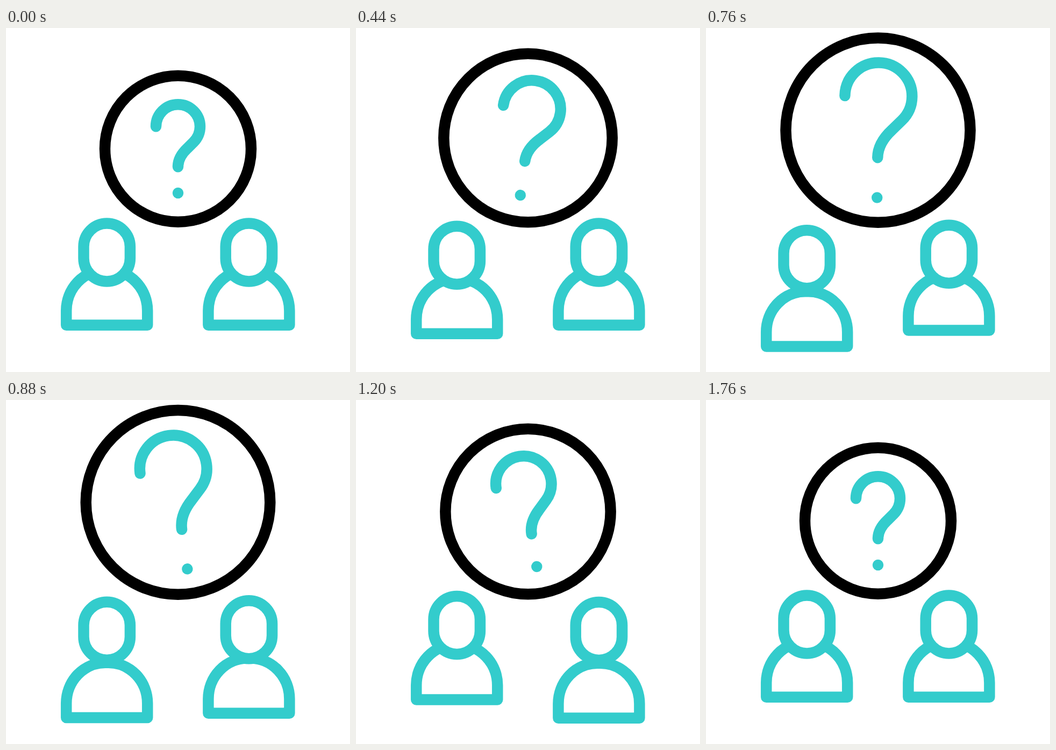
Recreate the animation shown at these times as an HTML page. Size 640 by 640 pixels, loop 1.84 s.

```html
<!DOCTYPE html>
<html lang="en">
<head>
<meta charset="utf-8">
<title>Question between two people</title>
<style>
  html, body { margin: 0; width: 100%; height: 100%; overflow: hidden; background: #fff; }
  svg {
    display: block; width: 100%; height: 100%;
    fill: none; stroke: #3cc; stroke-width: 20.5;
    stroke-linecap: round; stroke-linejoin: round;
  }

  /* The bubble grows while its outline keeps its weight. */
  .bubble * { vector-effect: non-scaling-stroke; stroke-width: 3.2vmin; }
  .ring { stroke: #000; transform-origin: 320px 356.8px; }
  .mark { transform-origin: 320px 224.7px; }
  .person { --delay: 0s; }
  .second { --delay: .36s; }
  .head { fill: #fff; }

  .ring, .mark, .head, .body {
    animation: 1.84s cubic-bezier(.667, 0, .333, 1) infinite;
  }
  .ring { animation-name: grow; }
  .mark { animation-name: lift, tilt; }
  .head { animation-name: nod; animation-delay: var(--delay); }
  .body { animation-name: sink; animation-delay: var(--delay); }

  @keyframes grow {
    0%, 2.174%, 86.957%, 100% { scale: 1; }
    43.478% { scale: 1.262; }
  }
  @keyframes lift {
    0%, 2.174%, 86.957%, 100% { translate: 0 0; scale: 1; }
    43.478% { translate: 0 -34.6px; scale: 1.525; }
  }
  @keyframes tilt {
    0%, 2.174%, 86.957%, 100% { rotate: 0deg; }
    28.261% { rotate: 7.8deg; }
    56.522% { rotate: -10deg; }
  }
  @keyframes nod {
    0%, 8.696%, 76.087%, 100% { translate: 0 0; }
    41.304% { translate: 0 12.7px; }
  }
  @keyframes sink {
    0%, 8.696%, 76.087%, 100% { translate: 0 0; }
    41.304% { translate: 0 39.7px; }
  }
</style>
</head>
<body>
<svg viewBox="0 0 640 640">
  <g class="bubble">
    <circle class="ring" cx="320" cy="224.7" r="136"/>
    <g class="mark">
      <path d="M279 183.2a41 41 0 0 1 82 0c0 11-4.3 21.3-12 29l-12 12c-10.500 10-17 22-17 34"/>
      <path d="M320 307h.01"/>
    </g>
  </g>
  <g class="person">
    <path class="body" d="M112.200 552.700V526a72.500 75.500 0 0 1 72.500-75.500h6a72.500 75.500 0 0 1 72.500 75.500v26.700z"/>
    <rect class="head" x="144.500" y="363.500" width="86.400" height="108" rx="43.200"/>
  </g>
  <g transform="translate(264.200 0)">
    <g class="person second">
      <path class="body" d="M112.200 552.700V526a72.500 75.500 0 0 1 72.500-75.500h6a72.500 75.500 0 0 1 72.500 75.500v26.700z"/>
      <rect class="head" x="144.500" y="363.500" width="86.400" height="108" rx="43.200"/>
    </g>
  </g>
</svg>
</body>
</html>
```
